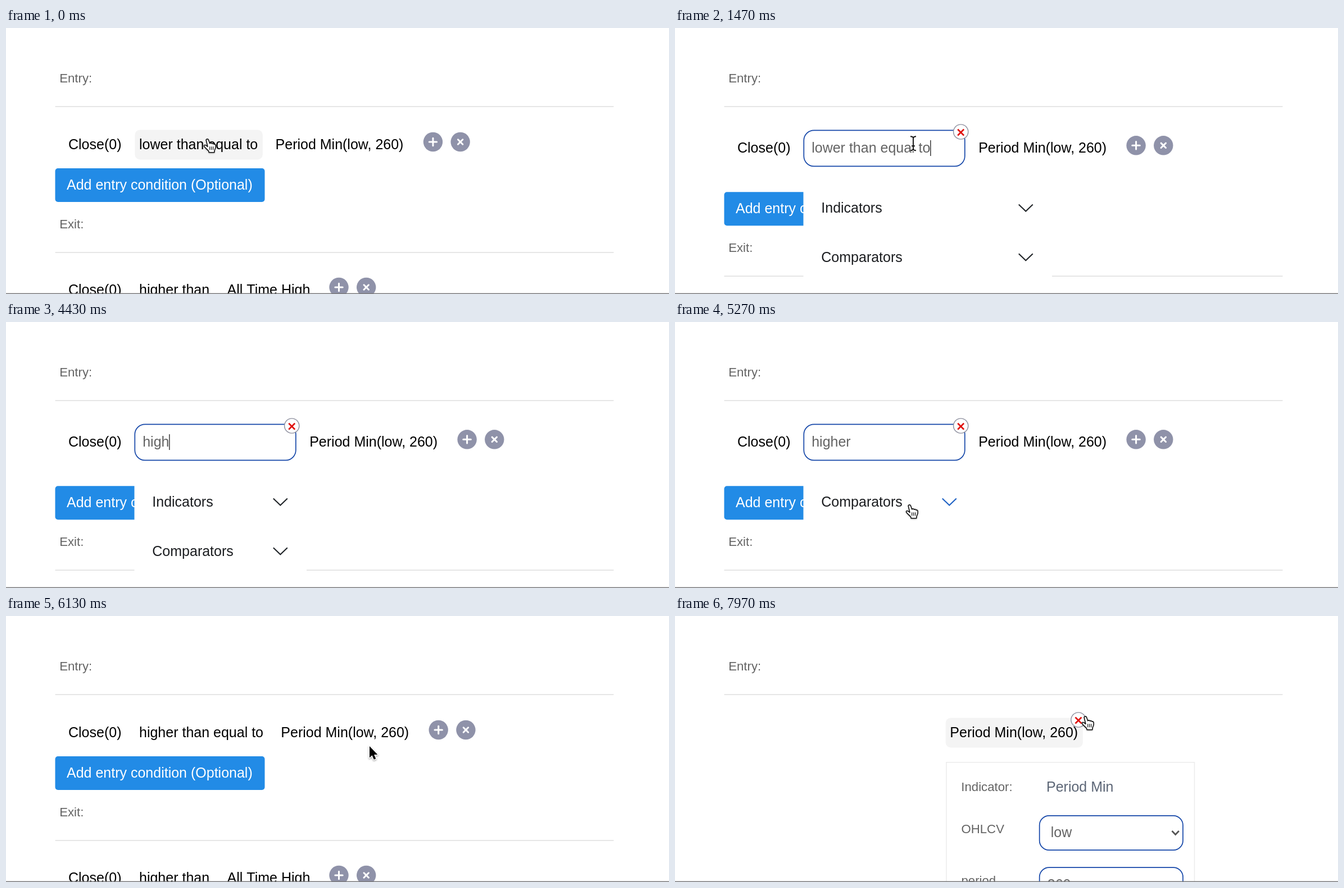
Recreate the animation shown at these times as an HTML page with a canvas. Size 1180 by 474 pixels, loop 8 s.

```html
<!DOCTYPE html>
<html lang="en">
<head>
<meta charset="utf-8">
<title>Condition editor</title>
<style>
html, body { margin: 0; width: 100%; height: 100%; overflow: hidden; background: #fff; }
canvas { display: block; width: 1180px; height: 474px; }
</style>
</head>
<body>
<canvas id="stage"></canvas>
<script>
const W = 1180, H = 474, LOOP = 8000;
const canvas = document.getElementById('stage');
const ctx = canvas.getContext('2d');
const dpr = window.devicePixelRatio || 1;
canvas.width = W * dpr;
canvas.height = H * dpr;

const BODY = 25, LABEL = 22.2;
const BLUE = '#228be6', EDGE = '#1446a8', GREY = '#646464', SLATE = '#5c6676';
const PERIOD = 'Period Min(low, 260)';
const LOWER = 'lower than equal to', HIGHER = 'higher than equal to';
const COMPARE_X = 237, ITEM_GAP = 31.3;

// Moments of the interaction, in ms
const T = {
  open: 300, clear: 1030, erase: 2308, type: 3290, narrow: 4230, only: 4560,
  expand: 5270, pick: 5810, hover: 6240, params: 6720
};
const KEYS = [T.type, 3600, 3950, 4230, 4560, 4700];

// Pointer hot spot: time, x, y
const PATH = [
  [0, 358.5, 198], [450, 358.5, 198], [830, 450, 182], [1060, 450, 182],
  [1660, 416, 213], [4740, 416, 213], [5150, 417.5, 326], [5330, 417.5, 326],
  [5700, 404, 438], [5820, 404, 438], [6110, 647, 232], [6170, 647, 232],
  [6330, 643, 212], [7500, 643, 212], [7770, 730.5, 179], [LOOP, 730.5, 179]
];

const HAND = new Path2D('M4.4 2.6C5.3.5 8 .5 8.8 2.6L11 9C12 7.5 14.5 7.8 15 9.5C16 8.3 18 8.8 18.3 10.4' +
  'C19.6 9.6 21.3 10.5 21.5 12.5C22 17 20.5 18.5 19.5 21L19 25L9.5 25L9 22.5C6.5 20 3 17 .8 14' +
  'C.3 11.6 2.8 11 4.6 12.6L7.2 14.6Z');
const ARROW = new Path2D('M0 0V20.5L4.6 16.2L7.8 23.7L11.3 22.2L8.1 14.9H14.4Z');
const BEAM = new Path2D('M-5-12.5C-2-12.5 0-11.5 0-9C0-11.5 2-12.5 5-12.5M0-9.5V9.5' +
  'M-5 12.5C-2 12.5 0 11.5 0 9C0 11.5 2 12.5 5 12.5M-3 4.5H3');

const clamp = v => Math.max(0, Math.min(1, v));
const ease = v => v * v * (3 - 2 * v);

function setFont(size) {
  ctx.font = size + 'px "Liberation Sans", Arial, Helvetica, sans-serif';
}

function text(str, x, y, color = '#000', size = BODY) {
  setFont(size);
  ctx.fillStyle = color;
  ctx.fillText(str, x, y);
}

function widthOf(str) {
  setFont(BODY);
  return ctx.measureText(str).width;
}

function box(x, y, w, h, r, fill, stroke, line = 1.7) {
  ctx.beginPath();
  ctx.roundRect(x, y, w, h, r);
  if (fill) { ctx.fillStyle = fill; ctx.fill(); }
  if (stroke) { ctx.strokeStyle = stroke; ctx.lineWidth = line; ctx.stroke(); }
}

function poly(points, color, line) {
  ctx.beginPath();
  points.forEach(([x, y]) => ctx.lineTo(x, y));
  ctx.strokeStyle = color;
  ctx.lineWidth = line;
  ctx.stroke();
}

function cross(x, y, r, color, line) {
  poly([[x - r, y - r], [x + r, y + r]], color, line);
  poly([[x - r, y + r], [x + r, y - r]], color, line);
}

function disc(x, y, r, fill) {
  ctx.beginPath();
  ctx.arc(x, y, r, 0, 7);
  ctx.fillStyle = fill;
  ctx.fill();
}

function icons(x, y) {
  disc(x, y, 17.2, '#8f92a9');
  disc(x + 48.7, y, 17.2, '#8f92a9');
  ctx.lineCap = 'round';
  poly([[x - 6.7, y], [x + 6.7, y]], '#fff', 3);
  poly([[x, y - 6.7], [x, y + 6.7]], '#fff', 3);
  cross(x + 48.7, y, 4.2, '#fff', 3);
  ctx.lineCap = 'butt';
}

function badge(x) {
  disc(x, 185, 13.8, '#8b8d9c');
  disc(x, 185, 12.4, '#fff');
  cross(x, 186, 5.5, '#e0100c', 2.6);
}

function pill(str, x) {
  box(x - 7.6, 181.5, widthOf(str) + 16.2, 53, 9, '#f4f4f4');
  text(str, x, 216);
}

function chevron(x, y, color, turn = 0) {
  ctx.save();
  ctx.translate(x, y);
  ctx.rotate(turn * -Math.PI);
  poly([[-12.5, -6], [0, 6], [12.5, -6]], color, 2.1);
  ctx.restore();
}

function rule(y) {
  box(87.5, y - 0.8, 994, 1.6, 0, '#dedede');
}

// Everything below the entry row, shifted down by dy
function lower(dy) {
  box(87.5, 250 + dy, 373, 60, 5, BLUE);
  text('Add entry condition (Optional)', 108, 288 + dy, '#fff');
  text('Exit:', 95.2, 356.7 + dy, GREY, LABEL);
  rule(400 + dy);
  text('Close(0)', 111, 475 + dy);
  text('higher than', COMPARE_X, 475 + dy);
  text('All Time High', 393.6, 475 + dy);
  icons(592.5, 462 + dy);
}

function row(periodX, y) {
  text('Close(0)', 111, y);
  text(PERIOD, periodX, y);
  icons(periodX + 280.4, y - 13);
}

function plainRow(str, hoverFirst, hoverLast) {
  const x = COMPARE_X + widthOf(str) + ITEM_GAP;
  lower(0);
  row(x, 216);
  if (hoverFirst) pill(str, COMPARE_X); else text(str, COMPARE_X, 216);
  if (hoverLast) pill(PERIOD, x);
}

function comparatorPopup() {
  lower(200);
  row(660.3, 391.5);
  pill(LOWER, COMPARE_X);
  badge(449);
  box(229, 260.7, 407, 173, 0, '#fff', '#ebebeb', 1.5);
  text('Indicator:', 256.8, 312, GREY, LABEL);
  text(LOWER, 396.8, 313.3, SLATE);
  box(248.7, 355, 119.5, 60, 5, '#6c757c');
  box(392.7, 355, 100.5, 60, 5, '#212329');
  text('Cancel', 269.5, 393, '#fff');
  text('Done', 412.8, 393, '#fff');
}

function periodPopup() {
  pill(PERIOD, COMPARE_X + widthOf(HIGHER) + ITEM_GAP);
  badge(718);
  box(483, 260.7, 441.5, 400, 0, '#fff', '#ebebeb', 1.5);
  text('Indicator:', 509.3, 312, GREY, LABEL);
  text('Period Min', 661, 313.3, SLATE);
  text('OHLCV', 509.5, 386.5, GREY, LABEL);
  text('period', 509.5, 479, GREY, LABEL);
  box(648.7, 355.8, 255.3, 61.4, 17, '#fff', EDGE);
  box(648.7, 448.2, 255.3, 61.4, 17, '#fff', EDGE);
  text('low', 668.8, 394, GREY);
  text('260', 662.8, 487, GREY);
  poly([[884.5, 383], [890.7, 389.4], [896.9, 383]], '#555', 2.8);
}

function typed(t) {
  if (t < T.type) {
    const gone = t < T.erase ? 0 : Math.floor((t - T.erase) / 33 + 0.5);
    return LOWER.slice(0, Math.max(0, LOWER.length - gone));
  }
  return 'higher'.slice(0, KEYS.filter(k => t >= k).length);
}

function caretOn(t) {
  if (t > 5200) return false;
  const lastKey = KEYS.filter(k => k <= t).pop();
  const since = lastKey || (t >= T.erase ? 2930 : T.clear);
  return t < since || Math.floor((t - since) / 500) % 2 === 0;
}

function menu(t) {
  const right = t < T.narrow ? 671 : 535;
  const single = t >= T.only;
  const open = ease(clamp((t - T.expand) / 330));
  const bottom = single ? 364 + 110 * open : H;
  ctx.save();
  ctx.beginPath();
  ctx.rect(228.5, 276, right - 228.5, bottom - 276);
  ctx.clip();
  ctx.fillStyle = '#fff';
  ctx.fillRect(228, 276, right, 200);
  const names = single ? ['Comparators'] : ['Indicators', 'Comparators'];
  names.forEach((name, i) => {
    text(name, 260.3, 328.7 + i * 87.8, '#1b1d20');
    chevron(right - 46.7, 320.5 + i * 87.8, t >= T.expand - 20 ? '#1f62c4' : '#212529', open);
  });
  if (open > 0) {
    text('higher than', 260.5, 409, '#1b1d20');
    text(HIGHER, 260.5, 452, '#1b1d20');
  }
  ctx.restore();
}

function editor(t) {
  lower(42.2);
  row(540.2, 222.3);
  box(229.3, 182.3, 286.5, 64, 18, '#fff', EDGE);
  const value = typed(t);
  text(value, 243.2, 222.3, GREY);
  if (caretOn(t)) box(242.8 + widthOf(value), 200, 1.6, 28, 0, '#444');
  badge(508.7);
  menu(t);
}

function pointerAt(t) {
  const i = Math.max(1, PATH.findIndex(p => p[0] > t));
  const [t0, x0, y0] = PATH[i - 1], [t1, x1, y1] = PATH[i];
  const k = ease(clamp((t - t0) / (t1 - t0)));
  return [x0 + (x1 - x0) * k, y0 + (y1 - y0) * k];
}

function withShadow(paint) {
  ctx.shadowColor = 'rgba(0,0,0,.35)';
  ctx.shadowBlur = 3 * dpr;
  ctx.shadowOffsetY = 1.5 * dpr;
  paint();
  ctx.shadowColor = 'transparent';
}

function outline(shape, color, line) {
  ctx.strokeStyle = color;
  ctx.lineWidth = line;
  ctx.stroke(shape);
}

function pointer(t) {
  if (t >= T.type && t < 4740) return;
  const [x, y] = pointerAt(t);
  ctx.save();
  ctx.translate(x, y);
  ctx.lineJoin = 'round';
  if (t >= 960 && t < 4880) {
    outline(BEAM, '#fff', 4);
    outline(BEAM, '#111', 1.9);
  } else if (t >= 5880 && t < T.hover) {
    withShadow(() => outline(ARROW, '#fff', 3));
    ctx.fillStyle = '#000';
    ctx.fill(ARROW);
  } else {
    ctx.translate(-6.8, -1.2);
    ctx.fillStyle = '#fff';
    withShadow(() => ctx.fill(HAND));
    outline(HAND, '#111', 1.6);
    for (const lx of [11, 14, 17]) poly([[lx, 14.5], [lx, 20.5]], '#111', 1.2);
  }
  ctx.restore();
}

function draw(t) {
  ctx.setTransform(dpr, 0, 0, dpr, 0, 0);
  ctx.fillStyle = '#fff';
  ctx.fillRect(0, 0, W, H);
  text('Entry:', 95.2, 96.9, GREY, LABEL);
  rule(140);
  if (t < T.open) plainRow(LOWER, true, false);
  else if (t < T.clear) comparatorPopup();
  else if (t < T.pick) editor(t);
  else if (t < T.params) plainRow(HIGHER, false, t >= T.hover);
  else periodPopup();
  ctx.fillStyle = '#7d7d7f';
  ctx.fillRect(0, 472.5, W, 1.5);
  pointer(t);
}

const start = performance.now();
function tick() {
  draw((performance.now() - start) % LOOP);
  requestAnimationFrame(tick);
}
tick();
</script>
</body>
</html>
```
